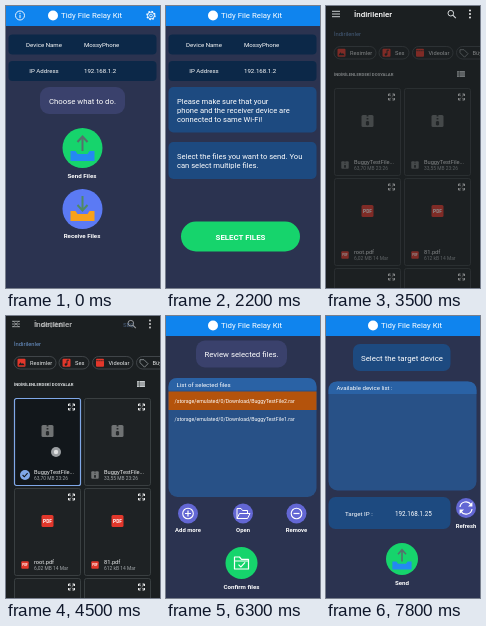
Write an HTML page that moves like this. It is 154 px wide and 282 px high and loops after 8000 ms.

```html
<!DOCTYPE html>
<html lang="en">
<head>
<meta charset="utf-8">
<title>File relay demo</title>
<style>
  html, body { margin: 0; width: 100%; height: 100%; overflow: hidden; background: #2b3350; }
  svg { display: block; width: 100vw; height: 100vh; }
  text { font-family: Roboto, "Noto Sans", sans-serif; }
</style>
</head>
<body>
<svg id="stage" viewBox="0 0 154 282" preserveAspectRatio="none"></svg>
<script>
const LOOP = 8000, STEP = 100;
const C = {
  bar: '#0f84ee', bg: '#2b3350', navy: '#0c2848', panel: '#1d4a80', indigo: '#3a416c',
  green: '#16d46c', violet: '#6367d4', dark: '#1b1f21', edge: '#3e4346', red: '#e2372b', sky: '#80a8e8'
};

// markup helpers
const rect = (x, y, w, h, fill, r = 0, more = '') =>
  `<rect x="${x}" y="${y}" width="${w}" height="${h}" rx="${r}" fill="${fill}" ${more}/>`;
const circle = (x, y, r, fill, more = '') => `<circle cx="${x}" cy="${y}" r="${r}" fill="${fill}" ${more}/>`;
const text = (x, y, size, str, fill = '#fff', more = '') =>
  `<text x="${x}" y="${y}" font-size="${size}" fill="${fill}" ${more}>${str}</text>`;
const mid = (x, y, size, str, more = '') => text(x, y, size, str, '#fff', `text-anchor="middle" ${more}`);
const bold = (x, y, size, str) => mid(x, y, size, str, 'font-weight="700"');
const line = (d, color = '#fff', w = 1, more = '') =>
  `<path d="${d}" fill="none" stroke="${color}" stroke-width="${w}" ${more}/>`;
const shape = (d, fill) => `<path d="${d}" fill="${fill}"/>`;
const at = (x, y, body) => `<g transform="translate(${x} ${y})">${body}</g>`;
const group = (id, body) => `<g id="${id}">${body}</g>`;

const screen = body => rect(0, 0, 154, 282, C.bg) + rect(0, 0, 154, 20, C.bar) +
  circle(47, 9.5, 5, '#fff') + text(55, 12.3, 7.85, 'Tidy File Relay Kit') + body;

const infoRow = (y, label, value) =>
  rect(2.5, y, 148, 20, C.navy, 4) + mid(38, y + 12.3, 6.1, label) + text(78, y + 12.3, 6.1, value);
const deviceRows = infoRow(28.5, 'Device Name', 'MossyPhone') + infoRow(55, 'IP Address', '192.168.1.2');

const tray = color => shape('M-12 2h5l2 3h10l2-3h5v10h-24z', color);
const arrow = (color, dir) =>
  line(`M0 ${7 * dir}V${-7 * dir}M-5 ${-2 * dir}L0 ${-7.5 * dir}L5 ${-2 * dir}`, color, 2);
const sendIcon = at(0, 1, tray('#2489f2')) + at(0, -4, arrow('#55706c', 1));
const receiveIcon = tray('#f7a11b') + at(0, -6, arrow('#4f8a63', -1));

function gear(x, y) {
  const teeth = circle(0, 0, 4, 'none', 'stroke="#fff" stroke-width="1.4" stroke-dasharray="1.57 1.57"');
  return at(x, y, teeth + circle(0, 0, 3.4, 'none', 'stroke="#fff" stroke-width=".9"') +
    circle(0, 0, 1.4, 'none', 'stroke="#fff" stroke-width=".8"'));
}

const home = screen(
  circle(14, 9.5, 4.5, 'none', 'stroke="#fff" stroke-width=".9"') +
  circle(14, 7.3, .65, '#fff') + line('M14 8.8v3.4', '#fff', 1) + gear(145, 9.5) + deviceRows +
  rect(34, 81, 85, 27, C.indigo, 9) + mid(76.5, 97.7, 7.8, 'Choose what to do.') +
  circle(76.5, 142, 20, C.green) + at(76.5, 142, sendIcon) + bold(76, 171.5, 6.2, 'Send Files') +
  circle(76.5, 203, 20, '#5b7af4') + at(76.5, 203, receiveIcon) + bold(76, 232, 6.2, 'Receive Files') +
  group('tapSend', circle(76.5, 142, 20, '#fff')));

const lines = (y, rows) => rows.map((s, i) => text(11, y + i * 9.2, 7.6, s)).join('');
const pick = screen(deviceRows +
  rect(2.5, 81, 148, 45.5, C.panel, 5) +
  lines(97.7, ['Please make sure that your', 'phone and the receiver device are', 'connected to same Wi-Fi!']) +
  rect(2.5, 136, 148, 37, C.panel, 5) +
  lines(153, ['Select the files you want to send. You', 'can select multiple files.']) +
  rect(15, 215.5, 119, 30, C.green, 15) + bold(74.5, 233.5, 7.9, 'SELECT FILES') +
  group('tapSelect', rect(15, 215.5, 119, 30, '#fff', 15)));

const splash = rect(0, 0, 154, 282, '#0c1214') + group('badge', circle(76.5, 155.5, 27, '#2f6cc4'));

// file picker
const fileIcon = (pdf, k) => {
  const body = pdf
    ? rect(-6, -6, 12, 12, C.red, 1.5) + text(0, 1.7, 4.8, 'PDF', '#fff', 'text-anchor="middle" font-weight="700"')
    : rect(-6, -6, 12, 12, '#707374', 1.5) + line('M0 -6V5', '#26292b', 1.8, 'stroke-dasharray="1.5 1.5"') +
      rect(-1.6, .5, 3.2, 3.4, '#26292b', .5);
  return `<g transform="scale(${k})">${body}</g>`;
};
const expand = line('M-3 -1V-3H-1M1 -3H3V-1M3 1V3H1M-1 3H-3V1M-2.5 -2.5L-.8 -.8M2.5 -2.5L.8 -.8M2.5 2.5L.8 .8M-2.5 2.5L-.8 .8', '#fff', .9);
const frame = (fill, edge, w) => rect(.5, .5, 66, 87, fill, 2, `stroke="${edge}" stroke-width="${w}"`);
const picked = id => group(id, frame('#12171b', C.sky, 1.2));
const check = id => group(id, rect(5, 71, 13, 13, '#12171b') + circle(11, 77, 5, C.sky) +
  line('M8.6 77l1.7 1.8 3.3-3.6', '#12171b', 1.1));
const card = (x, y, pdf, name, info, id) => at(x, y,
  frame('#1e2224', C.edge, .9) + (id ? picked(id) : '') + at(57.5, 9, expand) +
  at(33.5, 33, fileIcon(pdf, 1)) + at(11, 77, fileIcon(pdf, .62)) +
  text(20, 75.7, 5.7, name, '#eceeef') + text(20, 82.3, 4.9, info, '#a1a6a9') + (id ? check(id + 'Check') : ''));

const chip = (x, w, icon, label) =>
  rect(x, 40.5, w, 12.5, 'none', 6.2, `stroke="#4b5053" stroke-width=".8"`) +
  at(x + 7.5, 46.7, icon) + text(x + 16, 48.8, 5.7, label, '#e6e8e9');
const block = rect(-4, -4, 8, 8, C.red, 1);
const photo = block + shape('M-3 2.6l2-3 1.4 1.8 1-1.2 1.8 2.4z', C.dark);
const sound = block + line('M.5 2V-2.5h2', C.dark, .9) + circle(-.6, 1.8, 1.2, C.dark);
const film = block + line('M-3.5 -2h7', C.dark, 1, 'stroke-dasharray="1.2 .8"');
const tag = line('M-4 -3h4l4 4-3.5 3.5-4.5-4.5z', '#8b9194', .9);

const dots = [4.5, 8, 11.5].map(y => circle(144, y, .9, '#fff')).join('');
const barFiles = line('M6 5.3h8M6 8h8M6 10.7h8', '#c9cdcf', 1) +
  text(28, 11, 8, 'İndirilenler', '#fff', 'font-weight="500"') +
  circle(124.8, 7.2, 2.8, 'none', 'stroke="#d7dadc" stroke-width="1"') + line('M126.8 9.2l3 3', '#d7dadc', 1.1) + dots;
const barPicked = line('M7 5l6 6M13 5l-6 6', '#d7dadc', 1) +
  `<text id="count" x="28" y="11" font-size="8" fill="#fff" font-weight="500"></text>` +
  text(117, 10.6, 6, 'SEÇ', C.sky, 'font-weight="700"') + dots;

const files = rect(0, 0, 154, 282, C.dark) + group('barFiles', barFiles) + group('barPicked', barPicked) +
  group('list',
    text(8, 30, 5.8, 'İndirilenler', '#6d98d0') +
    chip(8, 42, photo, 'Resimler') + chip(53, 30, sound, 'Ses') + chip(86.5, 40.5, film, 'Videolar') +
    chip(130.5, 60, tag, 'Büyük dosyalar') +
    text(8, 69.8, 4.3, 'İNDİRİLENLERDEKİ DOSYALAR', '#d9dcde', 'font-weight="700"') +
    rect(131, 65, 8, 6, '#c9cdcf', .5) + line('M131 67h8M131 69h8M133.3 65v6', C.dark, .5) +
    card(8, 82, false, 'BuggyTestFile...', '63,70 MB 23:26', 'one') +
    card(78, 82, false, 'BuggyTestFile...', '33,55 MB 23:26', 'two') +
    card(8, 172, true, 'root.pdf', '6,02 MB 14 Mar') +
    card(78, 172, true, '81.pdf', '612 kB 14 Mar') +
    card(8, 262, true, '', '') + card(78, 262, true, '', '')) +
  group('touch', circle(0, 0, 5, '#c8cccf', 'fill-opacity=".75"') + circle(0, 0, 2.2, '#fff', 'fill-opacity=".7"'));

// review and target screens
const listPanel = (y, h, title) => rect(2.5, y, 148, h, '#285187', 9) +
  shape(`M2.5 ${y + 12.5}V${y + 9}q0 -9 9 -9h130q9 0 9 9v3.5z`, '#2a62a5') + text(10.5, y + 8.7, 6.1, title);
const path = n => `/storage/emulated/0/Download/BuggyTestFile${n}.rar`;
const round = (x, y, icon, label, labelY) => circle(x, y, 10, C.violet) + at(x, y, icon) + bold(x, labelY, 5.9, label);
const ring = circle(0, 0, 5.3, 'none', 'stroke="#fff" stroke-width="1.1"');
const folder = line('M-6 5V-5h4l1.5 2H4.5V0M-6 5L-3.5 0H7L4.5 5z', '#fff', 1, 'stroke-linejoin="round"');
const confirmIcon = line('M-7 6V-6h5l2 2.4H7V6z', '#fff', 1.2, 'stroke-linejoin="round"') +
  line('M-7 -2H7M-3 1.6l2.4 2.4L3.6 -.6', '#fff', 1.2);

const review = screen(
  rect(30, 24.5, 91, 27, C.indigo, 9) + mid(75.5, 41.3, 7.8, 'Review selected files.') +
  listPanel(62, 119, 'List of selected files') +
  rect(2.5, 75.5, 148, 18.5, '#b4530c') + text(8.5, 87, 5.25, path(2)) +
  text(8.5, 105, 5.25, path(1)) +
  round(22, 197.5, ring + line('M-3 0h6M0 -3v6', '#fff', 1.2), 'Add more', 215.7) +
  round(77, 197.5, folder, 'Open', 215.7) +
  round(130.5, 197.5, ring + line('M-3 0h6', '#fff', 1.2), 'Remove', 215.7) +
  circle(75.5, 247, 16, C.green) + at(75.5, 247, confirmIcon) + bold(75.5, 272.5, 6.2, 'Confirm files') +
  group('tapConfirm', circle(75.5, 247, 16, '#fff')));

const refreshIcon = line('M-6 -1A6 6 0 0 1 5 -3.4M6 1A6 6 0 0 1 -5 3.4', '#fff', 1.2) +
  shape('M6.4 -6v4.4H2zM-6.4 6V1.6H-2z', '#fff');
const target = screen(
  rect(27, 28, 97.5, 27, C.panel, 7) + mid(76, 45, 7.9, 'Select the target device') +
  listPanel(65.5, 109, 'Available device list :') +
  rect(2.5, 181, 122, 32, C.panel, 7) + text(19, 199.5, 6.2, 'Target IP :') + text(69, 199.5, 6.3, '192.168.1.25') +
  round(140, 192, refreshIcon, 'Refresh', 212) +
  circle(76, 243, 16, C.green) + at(76, 243, `<g transform="scale(.8)">${sendIcon}</g>`) + bold(76, 268.5, 6.2, 'Send'));

const scenes = { home, pick, splash, files, review, target };
document.getElementById('stage').innerHTML = Object.keys(scenes).map(k => group(k, scenes[k])).join('');
const el = {};
document.querySelectorAll('[id]').forEach(e => el[e.id] = e);

// timing helpers
const ramp = (t, a, b) => Math.min(1, Math.max(0, (t - a) / (b - a)));
const easeOut = p => 1 - (1 - p) ** 3;
const pulse = (t, a, b) => t > a && t < b ? .28 * Math.sin(Math.PI * ramp(t, a, b)) : 0;
const fade = (id, v) => {
  el[id].setAttribute('opacity', v);
  el[id].style.display = v > 0 ? '' : 'none';
};
const slide = (id, p) => el[id].setAttribute('transform', `translate(${154 * (1 - easeOut(p))} 0)`);
const within = (t, a, b) => t >= a && t < b ? 1 : 0;

// start, end, x, y of each touch
const touches = [[4100, 4700, 50, 136], [4900, 5200, 114, 136], [5400, 5500, 123, 8.5]];

function draw(t) {
  fade('home', within(t, 0, 1600));
  fade('pick', within(t, 1200, 2800) || within(t, 5800, 6300));
  slide('pick', t < 2800 ? ramp(t, 1100, 1600) : 1);
  fade('splash', within(t, 2800, 3400));
  fade('badge', .8 + .2 * ramp(t, 2800, 3000));
  fade('files', t < 5800 ? ramp(t, 3000, 3300) : 1 - ramp(t, 5700, 6000));
  fade('list', ramp(t, 3400, 3600));
  fade('review', within(t, 6000, 7400));
  slide('review', ramp(t, 5900, 6300));
  fade('target', within(t, 7000, LOOP));
  slide('target', ramp(t, 6900, 7400));

  fade('tapSend', pulse(t, 200, 1100));
  fade('tapSelect', pulse(t, 2200, 2800));
  fade('tapConfirm', pulse(t, 6600, 7100));

  const one = within(t, 4500, 5500), two = within(t, 5000, 5500);
  for (const [id, v] of [['one', one], ['two', two]]) {
    fade(id, v);
    fade(id + 'Check', v);
  }
  const bar = t < 5000 ? ramp(t, 4450, 4600) : 1 - ramp(t, 5400, 5600);
  fade('barFiles', 1 - bar);
  fade('barPicked', bar);
  el.count.textContent = (two ? 2 : 1) + ' seçildi';

  const hit = touches.find(h => within(t, h[0], h[1]));
  fade('touch', hit ? 1 : 0);
  if (hit) el.touch.setAttribute('transform', `translate(${hit[2]} ${hit[3]})`);
}

const start = performance.now();
function tick() {
  const t = (performance.now() - start) % LOOP;
  draw(Math.floor(t / STEP) * STEP);
  requestAnimationFrame(tick);
}
tick();
</script>
</body>
</html>
```
